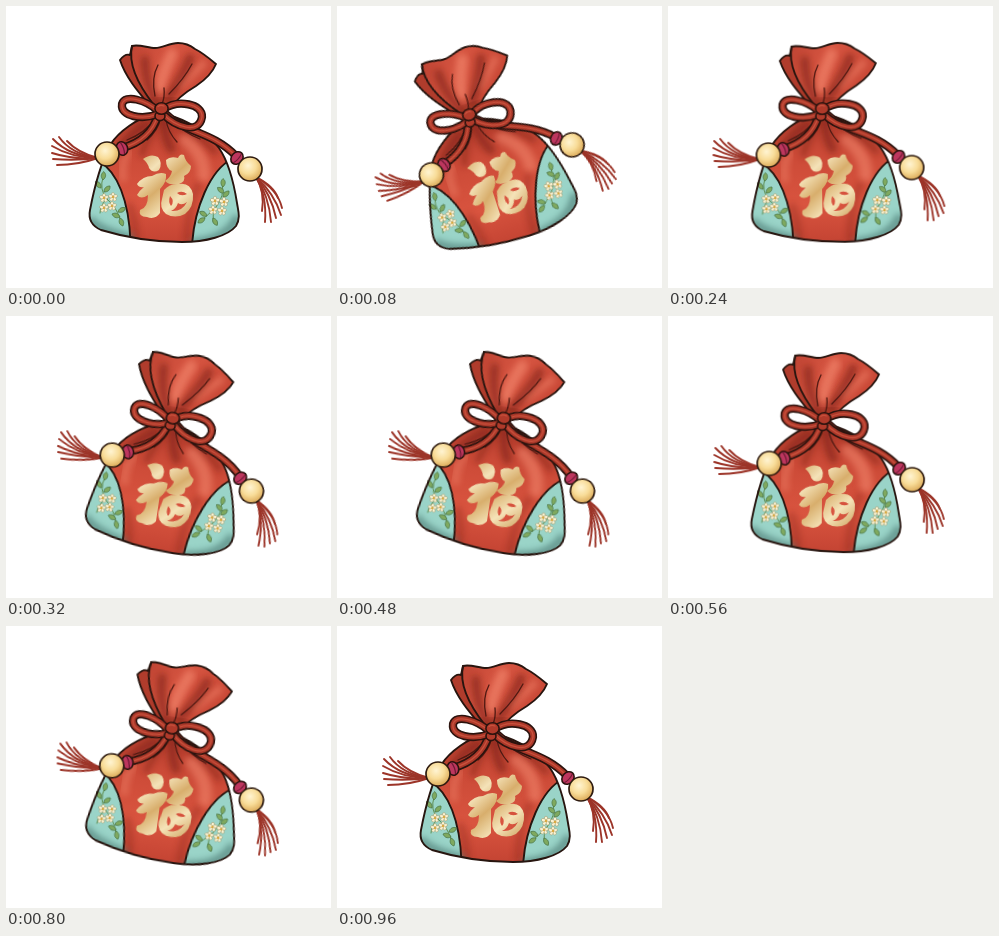
Animation of 325 by 282 pixels, one loop 1.71 s. Source, as an HTML page:

```html
<!DOCTYPE html>
<html lang="zh">
<head>
<meta charset="utf-8">
<title>福袋</title>
<style>
  html, body { margin: 0; width: 100%; height: 100%; overflow: hidden; background: #fff; }
  svg { display: block; width: 100vw; height: 100vh; }
  #bag { transform-origin: 163.5px 179px; animation: swing 1710ms step-end infinite; }
  @keyframes swing {
    0%      { transform: rotate(0deg); }
    4.678%  { transform: rotate(-18deg); }
    9.356%  { transform: rotate(-9.5deg); }
    14.035% { transform: rotate(-1deg); }
    18.713% { transform: rotate(8.5deg); }
    23.391% { transform: rotate(18deg); }
    28.07%  { transform: rotate(8.5deg); }
    32.748% { transform: rotate(0.5deg); }
    37.426% { transform: rotate(-7.7deg); }
    42.105% { transform: rotate(0.2deg); }
    46.783% { transform: rotate(7.8deg); }
    51.461% { transform: rotate(4deg); }
    56.14%, 100% { transform: rotate(0deg); }
  }
  .line { fill: none; stroke: #27150f; stroke-width: 1.9; stroke-linecap: round; stroke-linejoin: round; }
  .fold { fill: none; stroke: #4f1912; stroke-width: 1.3; stroke-linecap: round; }
  .dark { fill: none; stroke: #7d2119; stroke-linecap: round; filter: url(#soft); }
  .light { fill: none; stroke: #f0836a; stroke-linecap: round; filter: url(#soft); }
  .edge { fill: none; stroke: #2b130e; stroke-width: 8.2; stroke-linecap: round; }
  .rope { fill: none; stroke: #ab3829; stroke-width: 4.9; stroke-linecap: round; }
  .shine { fill: none; stroke: #c9513d; stroke-width: 1.3; stroke-linecap: round; }
  .tassel { fill: none; stroke: #9c3428; stroke-width: 1.9; stroke-linecap: round; }
  .stem { fill: none; stroke: #5f8f52; stroke-width: 1; stroke-linecap: round; }
  .leaf { fill: #7fa95f; stroke: #4a7545; stroke-width: .7; }
  .petal { fill: #fbf3d3; stroke: #8f8a5c; stroke-width: .5; }
</style>
</head>
<body>
<svg viewBox="0 0 325 282" preserveAspectRatio="none">
  <defs>
    <filter id="soft" x="-60%" y="-60%" width="220%" height="220%"><feGaussianBlur stdDeviation="3.2"/></filter>
    <linearGradient id="cloth" x1="0" y1="0" x2="0" y2="1">
      <stop offset="0" stop-color="#b03c2d"/><stop offset=".3" stop-color="#cb4a37"/>
      <stop offset=".7" stop-color="#d9543f"/><stop offset="1" stop-color="#c44433"/>
    </linearGradient>
    <linearGradient id="neck" x1="0" y1="0" x2="1" y2=".35">
      <stop offset="0" stop-color="#b83f2f"/><stop offset=".5" stop-color="#d65541"/><stop offset="1" stop-color="#c94836"/>
    </linearGradient>
    <linearGradient id="gold" gradientUnits="userSpaceOnUse" x1="134" y1="150" x2="187" y2="210">
      <stop offset="0" stop-color="#d8b070"/><stop offset=".22" stop-color="#f4e2b8"/>
      <stop offset=".46" stop-color="#d8ae6c"/><stop offset=".72" stop-color="#f5e3b8"/><stop offset="1" stop-color="#cfa361"/>
    </linearGradient>
    <radialGradient id="pearl" cx=".42" cy=".36" r=".68">
      <stop offset="0" stop-color="#fff4d2"/><stop offset=".5" stop-color="#f8dc98"/><stop offset="1" stop-color="#d9a653"/>
    </radialGradient>
    <path id="body" d="M148 108C132 112 113 125 104 139C95 157 88 183 84 204C82 214 86 220 95 224C118 231 148 236 176 236C200 236 222 230 230 220C235 212 232 204 231 197C228 178 222 155 213 142C203 128 182 114 162 109Z"/>
    <path id="top" d="M126 40C133 38 142 42 149 42C157 42 163 37 172 37C179 37 184 39 189 43C197 47 204 53 210 58C206 68 199 74 190 80C178 87 169 95 164 103L146 102C136 90 120 73 114 54C117 50 121 48 124 49Z"/>
    <path id="padL" d="M94 156C111 166 123 194 124.500 236L75 234L76 180Z"/>
    <path id="padR" d="M226 153C204 164 188 203 186 240L240 240L240 170Z"/>
    <clipPath id="inBody"><use href="#body"/></clipPath>
    <clipPath id="inTop"><use href="#top"/></clipPath>
    <g id="flower"></g>
    <path id="leaf" class="leaf" d="M0 0C-3 -3 -2.5 -6 0 -8.5C3 -6 3 -3 0 0Z"/>
  </defs>

  <g id="bag">
    <g id="tassels"></g>

    <use href="#body" fill="url(#cloth)"/>
    <g clip-path="url(#inBody)">
      <path class="light" stroke-width="13" opacity=".6" d="M180 134Q199 150 198 170"/>
      <path class="light" stroke-width="9" opacity=".45" d="M122 145Q115 156 117 172"/>
      <path class="dark" stroke-width="9" opacity=".6" d="M139 119Q124 129 112 144M158 114Q158 130 165 143"/>
      <path class="dark" stroke-width="6" opacity=".5" d="M150 114Q141 132 136 148M173 119Q195 129 209 146"/>
      <path class="dark" stroke-width="8" opacity=".3" d="M124 200Q129 215 130 233M192 180Q182 200 181 233"/>
      <use href="#padL" fill="#9ad4c8"/>
      <use href="#padR" fill="#9ad4c8"/>
      <path fill="none" stroke="#4f7f78" stroke-width="9" opacity=".7" filter="url(#soft)" d="M83 213Q92 225 127 233M186 237Q222 234 232 210"/>
      <use href="#padL" class="line" stroke-width="1.3"/>
      <use href="#padR" class="line" stroke-width="1.3"/>
      <path class="fold" d="M149 113Q139 127 121 134M154 114Q152 124 141 134M160 114Q162 126 171 136M167 116Q179 127 194 133"/>
    </g>
    <g id="garden">
      <path class="stem" d="M97 171Q93 184 101 193Q112 203 115 216M101 193Q94 199 94 207M216 177Q219 190 210 201Q203 208 196 214M210 201Q206 209 207 215"/>
    </g>
    <use href="#body" class="line"/>

    <g fill="url(#gold)" fill-rule="evenodd">
      <path d="M137 153Q145 147 152 151Q157 157 153 164Q147 168 143 162Q142 157 137 153Z"/>
      <path d="M131 178Q137 170 146 170Q154 165 160 168Q161 176 154 183L154 207Q149 214 141 211Q132 211 134 204Q142 202 142 189Q135 194 131 189Q134 184 138 181Q133 182 131 178Z"/>
      <path d="M160 154Q164 150 172 152Q174 147 178 149Q179 155 185 160Q185 167 178 170Q180 175 173 178Q164 180 159 175Q165 171 166 165Q160 163 160 154Z"/>
      <path d="M158 184Q164 177 173 178Q184 176 187 188Q188 201 179 208Q169 213 160 208Q153 202 156 193ZM164 190Q162 196 165 200Q169 195 164 190ZM171 187Q175 191 181 188Q176 184 171 187ZM172 197Q170 203 165 205Q176 206 181 196Q176 200 172 197Z"/>
    </g>

    <use href="#top" fill="url(#neck)"/>
    <g clip-path="url(#inTop)">
      <path fill="#b03c2c" d="M126 40C122 58 133 80 149 102L130 98L108 58Z"/>
      <path class="light" stroke-width="11" opacity=".7" d="M166 48Q157 66 154 82"/>
      <path class="light" stroke-width="8" opacity=".5" d="M197 58Q184 70 175 79"/>
      <path class="dark" stroke-width="9" opacity=".6" d="M184 52Q177 70 162 92M139 54Q139 76 149 96"/>
      <path class="dark" stroke-width="7" opacity=".55" d="M145 101Q156 92 168 96"/>
    </g>
    <path class="fold" d="M186 58Q178 73 163 88M152 59Q145 72 149 90M158 82Q159 91 156 98"/>
    <path class="line" d="M126 40C122 58 133 80 148 99"/>
    <use href="#top" class="line"/>

    <g id="ropes"></g>
    <g fill="#b03a2a" stroke="#2b130e" stroke-width="1.6">
      <ellipse cx="154" cy="110" rx="5" ry="4.600"/>
      <ellipse cx="155.500" cy="102.500" rx="6.600" ry="5.800"/>
    </g>
    <path class="shine" d="M152 100.500Q154.500 98.500 158 100"/>

    <g id="beads"></g>
  </g>
</svg>
<script>
  const $ = id => document.getElementById(id);
  const add = (id, html) => $(id).insertAdjacentHTML('beforeend', html);

  // five petals around a yellow heart
  for (let i = 0; i < 5; i++)
    add('flower', `<ellipse class="petal" cy="-2.9" rx="1.9" ry="2.4" transform="rotate(${i * 72})"/>`);
  add('flower', '<circle r="1.4" fill="#dba941"/>');

  const leaf = (x, y, a) => add('garden', `<use href="#leaf" transform="translate(${x} ${y}) rotate(${a})"/>`);
  const flower = (x, y, s) => add('garden', `<use href="#flower" transform="translate(${x} ${y}) scale(${s})"/>`);
  leaf(97, 174, 5); leaf(95, 182, -40); leaf(98, 186, 45);
  leaf(112, 206, 60); leaf(114, 211, -70); leaf(114, 212, 160);
  leaf(217, 181, 0); leaf(218, 187, -50); leaf(217, 191, 45);
  leaf(201, 210, -60); leaf(199, 212, 235); leaf(207, 212, 150);
  flower(98, 192, .85); flower(107, 191, .85); flower(98, 202, .85); flower(106, 200, .85);
  flower(209, 195, .9); flower(218, 196, .9); flower(207, 204, .85); flower(216, 205, .85);

  // each strand: end point, bend point
  const strands = (x, y, list) => list.forEach(([ex, ey, bx, by]) =>
    add('tassels', `<path class="tassel" d="M${x} ${y}Q${bx} ${by} ${ex} ${ey}"/>`));
  strands(92, 152, [
    [53, 131, 65, 148], [47, 133, 63, 150], [46, 140, 66, 152], [46, 147, 68, 154],
    [47, 153, 70, 155], [51, 159, 72, 159], [61, 135, 72, 147]
  ]);
  strands(250, 171, [
    [276, 202, 272, 184], [275, 209, 268, 187], [270, 212, 265, 188], [265, 216, 263, 190],
    [259, 216, 261, 190], [256, 205, 259, 186], [272, 192, 268, 180]
  ]);

  const rope = d => ['edge', 'rope', 'shine'].forEach(c => add('ropes', `<path class="${c}" d="${d}"/>`));
  rope('M152 109C147 126 134 137 116 142');
  rope('M160 108C178 127 206 125 230 150');
  rope('M152 105C140 94 119 88 116 98C114 111 137 114 152 108');
  rope('M158 103C172 93 197 98 196 111C193 129 170 121 157 108');

  const bead = (x, y, rx, ry, a) => add('beads',
    `<g transform="translate(${rx} ${ry}) rotate(${a})">
       <ellipse rx="5.6" ry="6.8" fill="#bd365e" stroke="#2b130e" stroke-width="1.6"/>
       <path d="M.5 -6q2 6 0 12" stroke="#6f1a35" stroke-width="1.2" fill="none"/>
     </g>
     <circle cx="${x}" cy="${y}" r="12" fill="url(#pearl)" stroke="#2e1b10" stroke-width="1.7"/>`);
  bead(101, 148, 116, 142.5, -20);
  bead(244, 163, 231, 152, 42);
</script>
</body>
</html>
```
